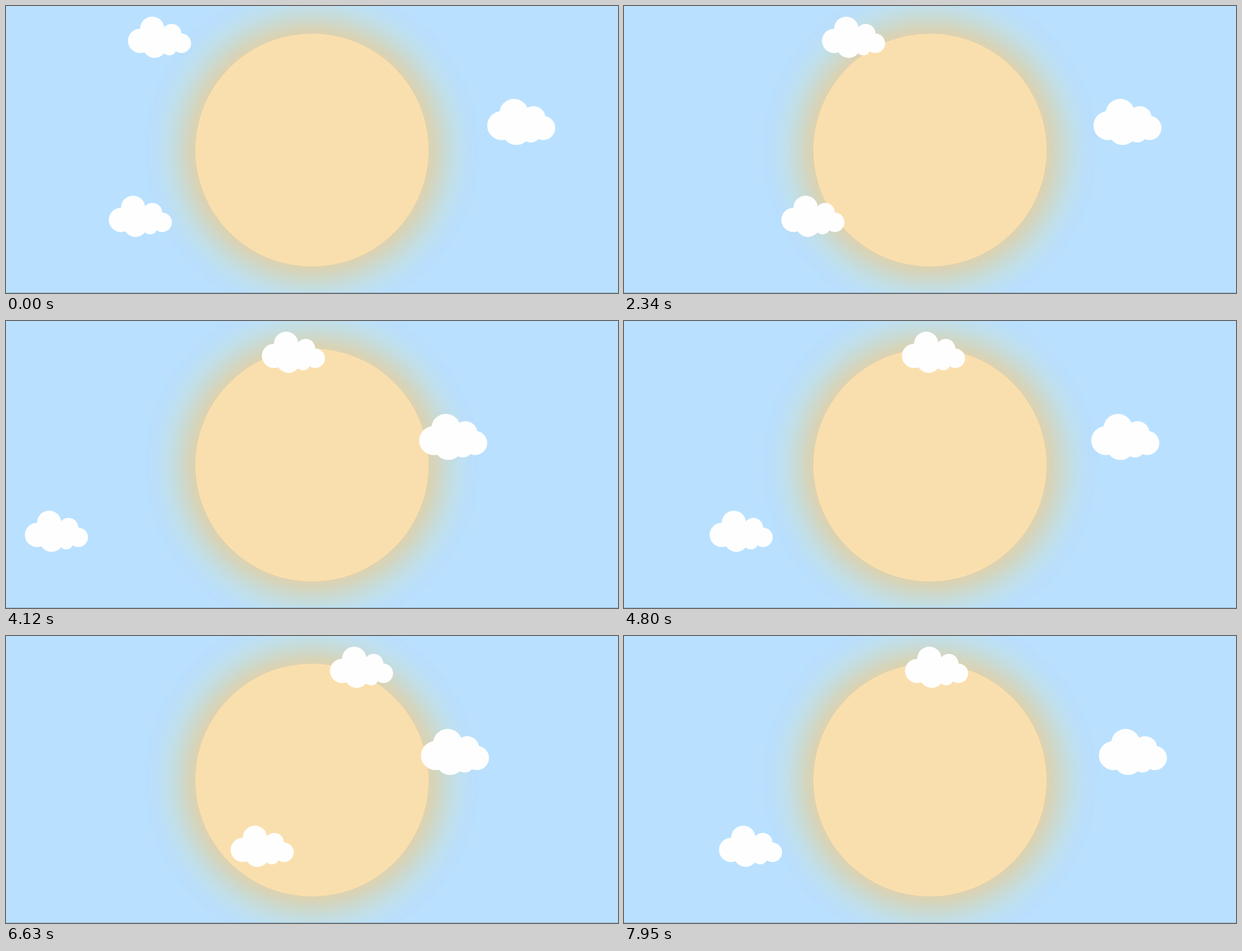
An HTML page that plays this animation: 1092x513 px, repeating every 8 s.

```html
<!DOCTYPE html>
<html lang="en">
<head>
<meta charset="utf-8">
<title>Sun and clouds</title>
<style>
  html, body { margin: 0; height: 100%; overflow: hidden; background: #b9e1ff; }
  svg { display: block; width: 100vw; height: 100vh; }
</style>
</head>
<body>
<svg viewBox="0 0 1092 513" preserveAspectRatio="none">
  <defs>
    <radialGradient id="glow" gradientUnits="userSpaceOnUse" cx="546" cy="257.5" r="308">
      <stop offset=".675" stop-color="#ddd2b0"/>
      <stop offset=".708" stop-color="#d6d4ba"/>
      <stop offset=".747" stop-color="#ced8ca"/>
      <stop offset=".795" stop-color="#c6dcdc"/>
      <stop offset=".838" stop-color="#c1dfea"/>
      <stop offset=".87" stop-color="#bee0f2"/>
      <stop offset=".91" stop-color="#bbdff9"/>
      <stop offset=".95" stop-color="#b9defd"/>
      <stop offset="1" stop-color="#b9e1ff"/>
    </radialGradient>
  </defs>
  <rect width="1092" height="513" fill="#b9e1ff"/>
  <circle cx="546" cy="257.5" r="308" fill="url(#glow)"/>
  <circle cx="546" cy="257.5" r="208" fill="#fadfae"/>
  <rect y="512" width="1092" height="1" fill="#8fb6d0"/>
  <g id="sky" fill="#fefefe"></g>
</svg>
<script>
  const LOOP = 8000, UNIT = 4.335;
  const sky = document.getElementById('sky');

  // Puffs as [left, top, diameter] in cloud units; grow widens each puff.
  const puffs = [[0, 5, 10], [5, 0, 10], [6, 7, 10], [14, 3, 8], [18, 7, 8], [14, 10, 6]];

  function makeCloud(grow) {
    const circles = puffs.map(([x, y, d]) => {
      const r = (d + grow) / 2;
      return `<circle cx="${(x + r) * UNIT}" cy="${(y + r) * UNIT}" r="${r * UNIT}"/>`;
    });
    const g = document.createElementNS('http://www.w3.org/2000/svg', 'g');
    g.innerHTML = circles.join('');
    return sky.appendChild(g);
  }

  // Distance in ms from t to the nearest multiple of period.
  const swing = (t, period) => Math.abs(t - period * Math.round(t / period));

  const clouds = [
    { y: 19, grow: 0, x: t => 590 - 0.0577 * Math.abs(t - 5000) },
    { y: 166, grow: 2, x: t => 711 + 0.1413 * swing(t, 2500) },
    { y: 339, grow: 0, x: t => 437 - 0.1743 * swing(t, 5000) }
  ];
  for (const c of clouds) c.el = makeCloud(c.grow);

  function draw() {
    const t = performance.now() % LOOP * 1.005 - 1456;
    for (const c of clouds) c.el.setAttribute('transform', `translate(${c.x(t)} ${c.y})`);
    requestAnimationFrame(draw);
  }
  draw();
</script>
</body>
</html>
```
